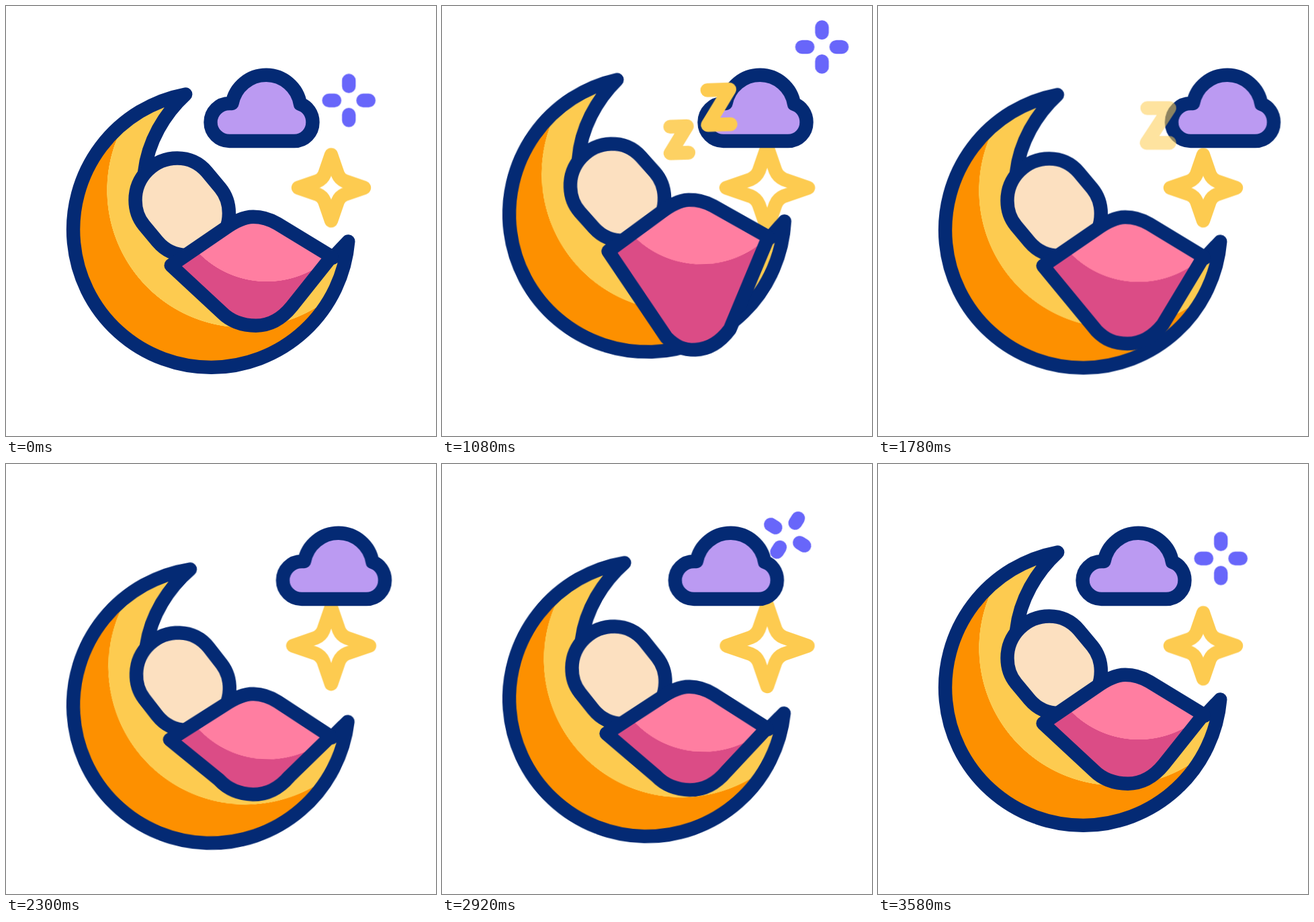
These frames come from a looping animation (640 by 640 pixels, 3600 ms). An HTML page:

```html
<!DOCTYPE html>
<html lang="en">
<head>
<meta charset="utf-8">
<title>Sleeping on the moon</title>
<style>
  html, body { margin: 0; width: 100%; height: 100%; overflow: hidden; background: #fff; }
  svg { display: block; width: 640px; height: 640px; }

  path { stroke-width: 20.4; stroke-linecap: round; stroke-linejoin: round; }
  .ink { stroke: #042a74; }
  .gold { fill: none; stroke: #fdcb50; }
  .violet { fill: none; stroke: #6866fa; }

  /* This curve is exactly 3t² - 2t³ */
  .move {
    animation: 3600ms cubic-bezier(.3333, 0, .6667, 1) infinite;
  }

  .cradle { transform-origin: 305px 333px; animation-name: rock; }
  @keyframes rock {
    0%, 100% { transform: translateY(0) rotate(0deg); }
    33.333%  { transform: translateY(-23.7px) rotate(-2deg); }
    66.667%  { transform: translateY(27.4px) rotate(2deg); }
  }

  .blanket { animation-name: breathe; }
  @keyframes breathe {
    0%, 100% { d: path("M245.6 386L326 331C340 321 353 313.7 368 313.7C382 313.7 394 318 404 324L484.5 373L425.5 447C411 465 393 475.7 372 475.7C352 475.7 335 470 321 456Z"); }
    33.333%  { d: path("M245.6 386L326 331C340 321 353 313.7 368 313.7C382 313.7 394 318 404 324L484.5 373L422.5 510C408 528 391 538.7 370 538.7C352 538.7 341 533 328 519Z"); }
    66.667%  { d: path("M245.6 386L326 331C340 321 353 313.7 368 313.7C382 313.7 394 318 404 324L484.5 373L425.5 433C411 451 393 461.7 372 461.7C352 461.7 335 456 321 442Z"); }
  }

  .cloud { animation-name: drift; }
  @keyframes drift {
    0%, 100% { transform: translateX(0); }
    50%      { transform: translateX(132.6px); }
  }

  .star { animation-name: pulse; animation-duration: 1800ms; }
  .star path { vector-effect: non-scaling-stroke; }
  @keyframes pulse {
    0%, 100% { transform: scale(1); }
    50%      { transform: scale(1.275); }
  }

  .flight {
    offset-path: path("M510.3 140.6C510.3 84 536 61 565.5 61");
    offset-rotate: 0deg;
    animation-name: fly;
  }
  @keyframes fly {
    0%, 90.6%, 100% { offset-distance: 0%; }
    24.4%, 65.6%    { offset-distance: 100%; }
  }

  .spark { animation-name: spin, blink; }
  @keyframes spin {
    0%, 90.6%, 100% { transform: translateX(0) rotate(0deg); }
    25%, 30%, 65.6% { transform: translateX(0) rotate(-180deg); }
    42%             { transform: translateX(5.5px) rotate(-180deg); }
    46%             { transform: translateX(3.5px) rotate(-180deg); }
  }
  @keyframes blink {
    0%, 43%, 65.6%, 100% { opacity: 1; }
    48%, 64.2%           { opacity: 0; }
  }

  .z1 { animation-name: snore1; }
  @keyframes snore1 {
    0%, 8.333%      { opacity: 0; }
    16.1%, 28.333%  { opacity: 1; }
    36.667%, 100%   { opacity: 0; }
  }
  .z2 { animation-name: snore2; }
  @keyframes snore2 {
    0%, 13.9%    { opacity: 0; }
    21.9%, 45.6% { opacity: 1; }
    53.9%, 100%  { opacity: 0; }
  }
</style>
</head>
<body>
<svg viewBox="0 0 640 640">
  <defs>
    <radialGradient id="moonFill" gradientUnits="userSpaceOnUse" cx="355" cy="274" r="205">
      <stop offset=".998" stop-color="#fdcb50"/>
      <stop offset="1" stop-color="#fd9000"/>
    </radialGradient>
    <radialGradient id="blanketFill" gradientUnits="userSpaceOnUse" cx="388" cy="268.5" r="142">
      <stop offset=".997" stop-color="#ff7ea1"/>
      <stop offset="1" stop-color="#db4c86"/>
    </radialGradient>
  </defs>

  <g transform="translate(484 270.5)">
    <g class="star move">
      <path class="gold" d="M0-49L10-20Q13-13 20-10L49 0L20 10Q13 13 10 20L0 49L-10 20Q-13 13-20 10L-49 0L-20-10Q-13-13-10-20Z"/>
    </g>
  </g>

  <g class="flight move">
    <g class="spark move">
      <path class="violet" d="M0-21.3V-29.6M21.3 0H29.6M0 21.3V29.6M-21.3 0H-29.6"/>
    </g>
  </g>

  <g class="cloud move">
    <path class="ink" fill="#bb9af2" d="M332.5 201A28 28 0 0 1 332.5 145H336.5A51.5 51.5 0 0 1 438 146C449 149.5 456.5 160 456.5 173C456.5 188.5 444.5 201 429 201Z"/>
  </g>

  <g class="cradle move">
    <path class="ink" fill="url(#moonFill)" d="M267.2 131.4A205 205 0 1 0 509.3 350.4L486 375L330 395L250 330L206 248C211 202 236 160 267.2 131.4Z"/>
    <path class="ink" fill="#fce0c0" d="M255 226.5C273 226.5 288 234 299 247L319 271C328 282 331.9 293 331.9 308.4C331.9 343 304 370.9 269.4 370.9C251.4 370.9 236.4 363.4 225.4 350.4L205.4 326.4C196.4 315.4 192.5 304.4 192.5 289C192.5 254.5 220.5 226.5 255 226.5Z"/>
    <path class="ink blanket move" fill="url(#blanketFill)" d="M245.6 386L326 331C340 321 353 313.7 368 313.7C382 313.7 394 318 404 324L484.5 373L425.5 447C411 465 393 475.7 372 475.7C352 475.7 335 470 321 456Z"/>
    <path class="gold z1 move" d="M344 204H369L343 243.5H370"/>
    <path class="gold z2 move" d="M401 151.5H434L400 203.3H434"/>
  </g>
</svg>
</body>
</html>
```
